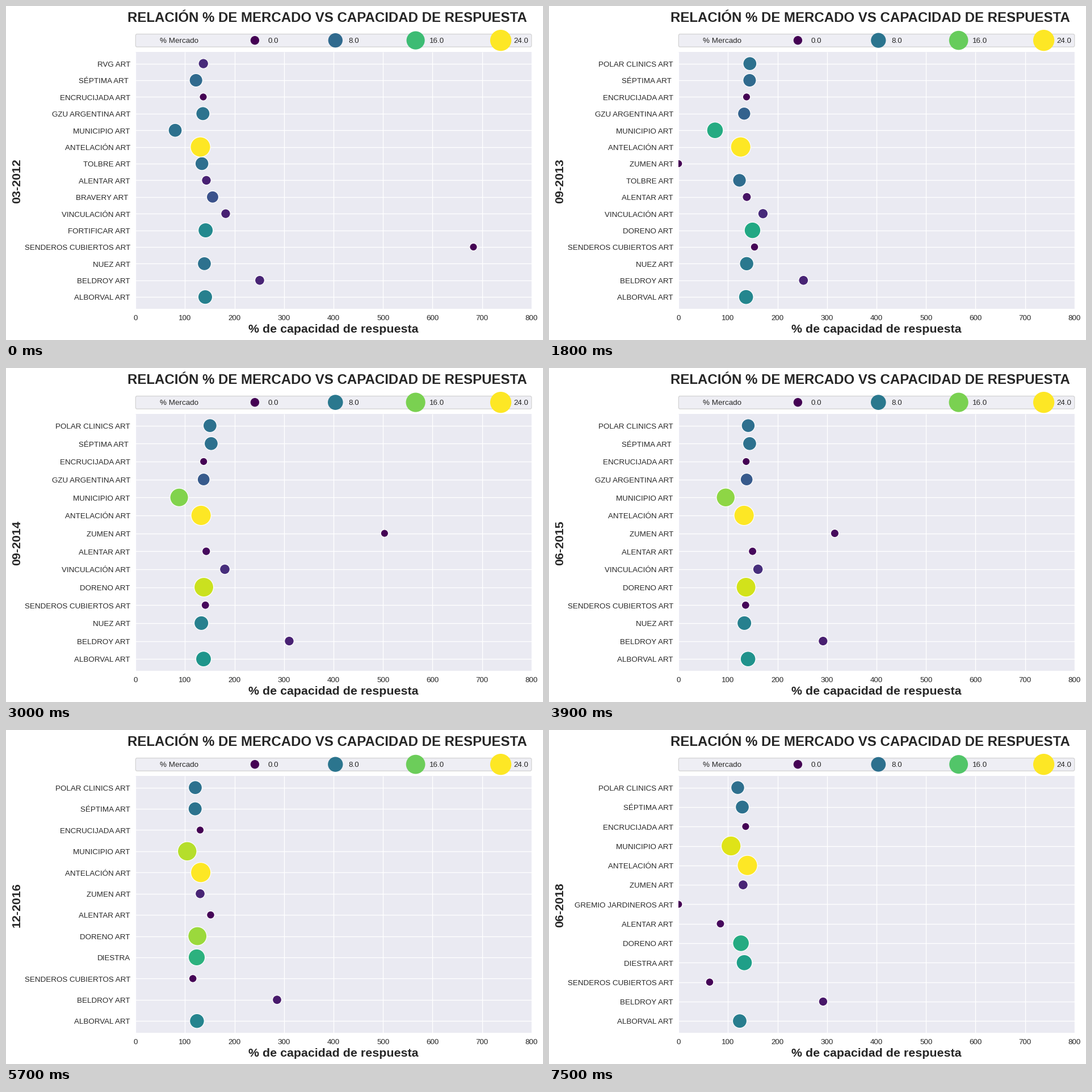
A matplotlib script for the animation above (7800 ms loop, 946 by 589 pixels).

```python
import numpy as np
import matplotlib.pyplot as plt
from matplotlib.animation import FuncAnimation
from matplotlib.patches import FancyBboxPatch, Rectangle

W, H, DPI = 946, 589, 96
LEFT, RIGHT, TOP, BOTTOM = 228.3, 925.8, 81.0, 533.8
ROW_TOP, ROW_BOTTOM = 101.6, 513.2
QUARTERS = 26
INK = "#262626"

# Quarters (counted from 03-2012) at which the values below are known.
KNOWN = np.array([0, 4, 6, 10, 16, 19, 25])
MAX_SHARE = [23.4, 21.3, 20.8, 20, 20, 20.6, 22]

# Response capacity in %, insurers from the bottom row to the top one.
CAPACITY = {
    "ALBORVAL": [140.7, 139.7, 136.3, 137.3, 143.3, 124, 123.5],
    "BELDROY": [250.8, 257, 252.3, 310.4, 273.4, 285.8, 292],
    "NUEZ": [139, 140, 137.5, 132.9],
    "SENDEROS CUBIERTOS": [682.6, 176.5, 153.4, 141, 129.8, 115.7, 62.7],
    "FORTIFICAR": [141.5],
    "TRAYECTORIA": [142.7],
    "DIESTRA": [145.7, 123.5, 132.7],
    "DORENO": [147, 149.3, 137.9, 134.6, 124.9, 126],
    "VINCULACIÓN": [182, 184.5, 170.5, 180.3, 140.5],
    "BRAVERY": [155.6, 166.5],
    "ALENTAR": [143, 135.5, 137.8, 142.7, 156.2, 151.6, 84.5],
    "TOLBRE": [134, 125.8, 123],
    "GREMIO JARDINEROS": [0],
    "ZUMEN": [0, 503, 128, 130.4, 130.3],
    "ANTELACIÓN": [131, 122.5, 125.5, 132.3, 132.3, 131.7, 139],
    "MUNICIPIO": [80, 81, 73.6, 88, 102.3, 104.3, 106],
    "GZU ARGENTINA": [136, 136.5, 132.5, 137.5],
    "ENCRUCIJADA": [136.7, 138.5, 137.3, 137.5, 135.5, 130.4, 135.5],
    "SÉPTIMA": [122, 138, 143.5, 152.7, 134.4, 120.3, 128.7],
    "RVG": [137, 138],
    "POLAR CLINICS": [144, 150.3, 131, 120.6, 119.5],
}

# Market share relative to the largest insurer.
SHARE = {
    "ALBORVAL": [.43, .48, .46, .52, .49, .45, .42],
    "BELDROY": [.10, .09, .10, .09, .08, .07, .06],
    "NUEZ": [.37, .39, .40, .43],
    "SENDEROS CUBIERTOS": [0, 0, .01, .02, .01, .01, .01],
    "FORTIFICAR": [.47],
    "TRAYECTORIA": [.28],
    "DIESTRA": [.44, .64, .56],
    "DORENO": [.59, .60, .92, .94, .85, .61],
    "VINCULACIÓN": [.09, .08, .12, .13, .13],
    "BRAVERY": [.25, .20],
    "ALENTAR": [.09, .07, .05, .03, .01, .01, .02],
    "TOLBRE": [.36, .36, .35],
    "GREMIO JARDINEROS": [0],
    "ZUMEN": [0, 0, .05, .10, .10],
    "ANTELACIÓN": [1] * 7,
    "MUNICIPIO": [.37, .47, .61, .81, .85, .89, .95],
    "GZU ARGENTINA": [.38, .33, .31, .28],
    "ENCRUCIJADA": [0] * 7,
    "SÉPTIMA": [.34, .36, .34, .37, .37, .38, .37],
    "RVG": [.12, .15],
    "POLAR CLINICS": [.37, .37, .35, .37, .36],
}

# First and last quarter of the insurers that are not there throughout.
SPAN = {
    "NUEZ": (0, 14), "FORTIFICAR": (0, 1), "TRAYECTORIA": (15, 17),
    "DIESTRA": (15, 25), "DORENO": (2, 25), "VINCULACIÓN": (0, 17),
    "BRAVERY": (0, 5), "TOLBRE": (0, 8), "GREMIO JARDINEROS": (25, 25),
    "ZUMEN": (6, 25), "GZU ARGENTINA": (0, 14), "RVG": (0, 5),
    "POLAR CLINICS": (6, 25),
}

plt.rcParams["font.family"] = "Liberation Sans"
viridis = plt.get_cmap("viridis")

fig = plt.figure(figsize=(W / DPI, H / DPI), dpi=DPI, facecolor="white")
ax = fig.add_axes([0, 0, 1, 1])
ax.set_xlim(0, W)
ax.set_ylim(H, 0)
ax.axis("off")


def label(x, y, text="", size=10, **kw):
    kw = {"ha": "left", "va": "baseline", "color": INK, **kw}
    return ax.text(x, y, text, fontsize=size, **kw)


def x_pos(value):
    return LEFT + (RIGHT - LEFT) * np.asarray(value) / 800


def dot_size(share):
    return 100 + 600 * np.asarray(share)


def span(name):
    return SPAN.get(name, (0, QUARTERS - 1))


def value_at(table, name, quarter):
    first, last = span(name)
    known = KNOWN[(KNOWN >= first) & (KNOWN <= last)]
    return np.interp(quarter, known, table[name])


def row_label(name, quarter):
    """Text and right edge; some names carry a trailing blank."""
    blank = name == "BRAVERY" or (name == "SÉPTIMA" and quarter < 17)
    text = name if name == "DIESTRA" and quarter == 19 else name + " ART"
    return text, 218.9 - 3.5 * blank


# Plot panel and its grid
panel = Rectangle((LEFT, TOP), RIGHT - LEFT, BOTTOM - TOP,
                  facecolor="#EAEAF2", linewidth=0, zorder=0)
ax.add_patch(panel)
for tick in range(0, 801, 100):
    line, = ax.plot([x_pos(tick)] * 2, [TOP, BOTTOM], color="white", lw=1,
                    solid_capstyle="butt", zorder=1)
    line.set_clip_path(panel)
    label(x_pos(tick), 553.5, str(tick), ha="center")

rows = [ax.plot([], [], color="white", lw=1, solid_capstyle="butt",
                zorder=1)[0] for _ in range(15)]
names = [label(0, 0, ha="right") for _ in rows]

# Titles
label(565.5, 28, "RELACIÓN % DE MERCADO VS CAPACIDAD DE RESPUESTA", 18,
      ha="center", weight="bold")
label(577, 576, "% de capacidad de respuesta", 16, ha="center", weight="bold")
date = label(25, 309, "", 16, ha="center", weight="bold", rotation=90,
             rotation_mode="anchor")

# Legend
ax.add_patch(FancyBboxPatch((LEFT, 49.5), RIGHT - LEFT, 22.7,
                            boxstyle="round,pad=0,rounding_size=2.67",
                            facecolor="#EAEAF2", edgecolor="0.8",
                            alpha=0.8, lw=1))
label(270.8, 65, "% Mercado")
for x, text in zip((461, 603, 745.5, 894.3), ("0.0", "8.0", "16.0", "24.0")):
    label(x, 65, text)
key = ax.scatter([438.4, 580.3, 721.6, 871.6], [60.6] * 4, linewidths=1.5,
                 zorder=3)

dots = ax.scatter([], [], edgecolors="white", linewidths=0.9, zorder=3)
dots.set_clip_path(panel)


def draw(quarter):
    date.set_text(f"{3 * (quarter % 4 + 1):02d}-{2012 + quarter // 4}")

    active = [n for n in CAPACITY if span(n)[0] <= quarter <= span(n)[1]]
    ys = np.linspace(ROW_BOTTOM, ROW_TOP, len(active))
    for i, (line, text) in enumerate(zip(rows, names)):
        shown = i < len(active)
        line.set_visible(shown)
        text.set_visible(shown)
        if shown:
            line.set_data([LEFT, RIGHT], [ys[i]] * 2)
            caption, edge = row_label(active[i], quarter)
            text.set_text(caption)
            text.set_position((edge, ys[i] + 5.3))

    xs = x_pos([value_at(CAPACITY, n, quarter) for n in active])
    shares = np.array([value_at(SHARE, n, quarter) for n in active])
    dots.set_offsets(np.column_stack([xs, ys]))
    dots.set_sizes(dot_size(shares))
    dots.set_facecolor(viridis(shares))

    top_share = np.interp(quarter, KNOWN, MAX_SHARE)
    levels = np.clip(np.array([0, 8, 16, 24]) / top_share, 0, 1)
    key.set_sizes(dot_size(levels))
    key.set_facecolor(viridis(levels))
    key.set_edgecolor(viridis(levels))
    return [date, dots, key, *rows, *names]


anim = FuncAnimation(fig, draw, frames=QUARTERS, interval=300, repeat=True,
                     repeat_delay=0, blit=False)
plt.show()
```
